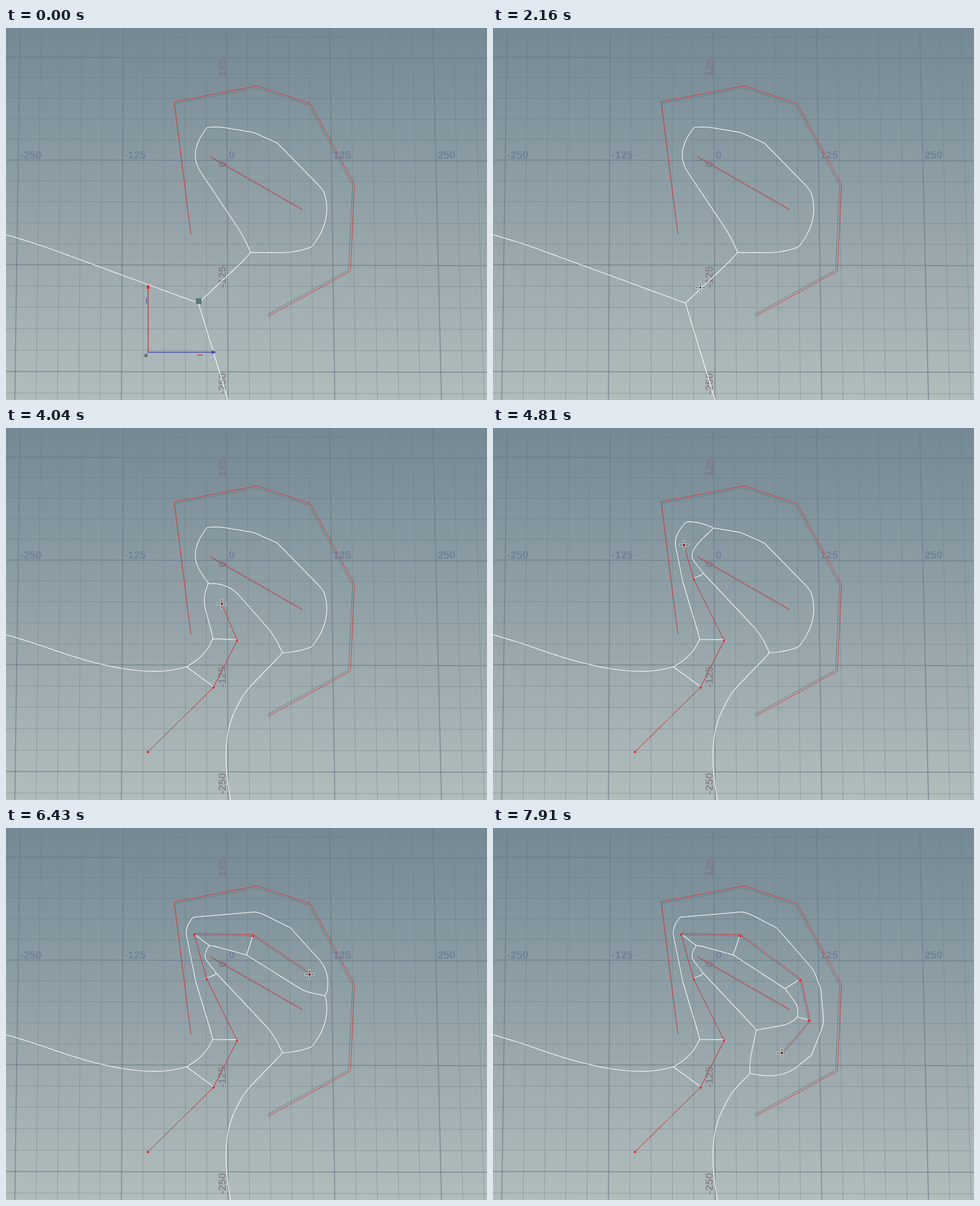
An HTML page with a canvas that plays this animation: 851x658 px, repeating every 8 s.

```html
<!DOCTYPE html>
<html lang="en">
<head>
<meta charset="utf-8">
<title>Interactive medial axis</title>
<style>
html, body { margin: 0; width: 100%; height: 100%; overflow: hidden; background: #93a2a7; }
canvas { display: block; }
</style>
</head>
<body>
<canvas id="stage" width="851" height="658"></canvas>
<script>
const W = 851, H = 658, LOOP = 8000, CELL = 4;
const ctx = document.getElementById('stage').getContext('2d');
const RED = '#ee2424', GREY = '#6a7c81';

// The fixed shapes, and the start of the curve drawn by the pointer
const SHELL = [[327, 364], [298, 134], [444, 106], [536, 137], [613, 278], [606, 428], [462, 507]];
const BAR = [[360, 228], [524, 322]];
const START = [251, 573];

const HOVER = 600, HANDLE_END = 2160, SOLVE_FROM = 2550;
const MIN_LIVE = 60;   // a shorter last segment is not solved yet
const LIFT = 1.6;      // the curve lies a little above its dots

// Pointer path: time, position, and whether it clicks there
const PATH = [
  { t: 70, at: [586, 619] },
  { t: 610, at: [326, 482] },
  { t: 1070, at: [366, 462] },
  { t: 2240, at: [367, 459], click: true },
  { t: 2550, at: [367, 459] },
  { t: 2870, at: [376, 444] },
  { t: 3330, at: [440, 374] },
  { t: 3560, at: [409, 376], click: true },
  { t: 4040, at: [382, 311] },
  { t: 4350, at: [355, 267], click: true },
  { t: 4950, at: [333, 189], click: true },
  { t: 5580, at: [377, 169] },
  { t: 5820, at: [437, 191], click: true },
  { t: 6430, at: [537, 259] },
  { t: 6590, at: [543, 269], click: true },
  { t: 7110, at: [559, 341], click: true },
  { t: 7760, at: [511, 398] }
];

const mix = (a, b, k) => a + (b - a) * k;

function pointerAt(t) {
  if (t < PATH[0].t) return null;
  const i = PATH.findIndex(p => p.t > t);
  if (i < 0) return PATH[PATH.length - 1].at;
  const a = PATH[i - 1], b = PATH[i], k = (t - a.t) / (b.t - a.t);
  return [mix(a.at[0], b.at[0], k), mix(a.at[1], b.at[1], k)];
}

function segments(group, pts) {
  return pts.slice(1).map((q, i) => {
    const p = pts[i], dx = q[0] - p[0], dy = q[1] - p[1];
    return { group, i, p, q, dx, dy, len: Math.hypot(dx, dy) };
  });
}

function distance(s, x, y) {
  const px = x - s.p[0], py = y - s.p[1], dot = px * s.dx + py * s.dy;
  if (dot <= 0) return Math.sqrt(px * px + py * py);
  if (dot >= s.len * s.len) {
    const qx = x - s.q[0], qy = y - s.q[1];
    return Math.sqrt(qx * qx + qy * qy);
  }
  return Math.abs(px * s.dy - py * s.dx) / s.len;
}

// Inside the shell only its two open ends are kept apart
const borderShown = (a, b) =>
  a.group !== 'shell' || b.group !== 'shell' || Math.abs(a.i - b.i) === SHELL.length - 2;

// Traces the Voronoi borders between segments on a coarse grid
function traceBorders(sites) {
  const cols = Math.ceil(W / CELL) + 1, rows = Math.ceil(H / CELL) + 1;
  const label = new Uint8Array(cols * rows), near = new Float64Array(cols * rows);
  for (let n = 0; n < near.length; n++) {
    const x = n % cols * CELL, y = Math.floor(n / cols) * CELL;
    let best = Infinity;
    for (let i = 0; i < sites.length; i++) {
      const d = distance(sites[i], x, y);
      if (d < best - 1e-6) { best = d; label[n] = i; }
    }
    near[n] = best;
  }
  const cross = (hits, c0, r0, c1, r1) => {
    const m = r0 * cols + c0, n = r1 * cols + c1;
    if (label[m] === label[n]) return;
    const a = sites[label[m]], b = sites[label[n]];
    if (!borderShown(a, b)) return;
    const f = distance(b, c0 * CELL, r0 * CELL) - near[m];
    const g = distance(a, c1 * CELL, r1 * CELL) - near[n];
    if (f < 1e-4 || g < 1e-4) return;
    const k = f / (f + g);
    hits.push([mix(c0, c1, k) * CELL, mix(r0, r1, k) * CELL]);
  };
  const path = new Path2D();
  for (let r = 0; r < rows - 1; r++) {
    for (let c = 0; c < cols - 1; c++) {
      const m = r * cols + c, l = label[m];
      if (l === label[m + 1] && l === label[m + cols] && l === label[m + cols + 1]) continue;
      const hits = [];
      cross(hits, c, r, c + 1, r);
      cross(hits, c + 1, r, c + 1, r + 1);
      cross(hits, c, r + 1, c + 1, r + 1);
      cross(hits, c, r, c, r + 1);
      if (hits.length < 2) continue;
      const mid = [0, 1].map(j => hits.reduce((sum, h) => sum + h[j], 0) / hits.length);
      const hub = hits.length === 2 ? hits.pop() : mid;
      for (const h of hits) { path.moveTo(...h); path.lineTo(...hub); }
    }
  }
  return path;
}

function line(pts, color, width = 1, dash = []) {
  ctx.strokeStyle = color;
  ctx.lineWidth = width;
  ctx.setLineDash(dash);
  ctx.beginPath();
  pts.forEach(p => ctx.lineTo(p[0], p[1]));
  ctx.stroke();
  ctx.setLineDash([]);
}

function box(x, y, size, color) {
  ctx.fillStyle = color;
  ctx.fillRect(x - size / 2, y - size / 2, size, size);
}

const columnX = (i, y) => mix(390, 393, y / H) + i * mix(36.5, 37.75, y / H);
const rowY = k => 234 + 36.7 * k + 0.07 * k * k;

function drawGround() {
  const sky = ctx.createLinearGradient(0, 0, 0, H);
  sky.addColorStop(0, '#748994');
  sky.addColorStop(0.5, '#93a2a8');
  sky.addColorStop(1, '#b2bdbd');
  ctx.fillStyle = sky;
  ctx.fillRect(0, 0, W, H);

  const rule = (i, a, b) => i % 5
    ? line([a, b], 'rgba(100,119,130,.47)', 1)
    : line([a, b], 'rgba(104,123,133,.6)', 2);
  for (let i = -11; i <= 13; i++) rule(i, [columnX(i, 0), 0], [columnX(i, H), H]);
  for (let k = -6; k <= 11; k++) rule(k, [0, rowY(k) - 0.5], [W, rowY(k) + 0.9]);

  ctx.font = 'bold 19px "Liberation Sans", Arial, sans-serif';
  for (let n = -2; n <= 2; n++) {
    ctx.fillStyle = 'rgba(104,120,153,.75)';
    ctx.textAlign = 'left';
    ctx.fillText(n * 125, columnX(n * 5, 231) + 3, 231);
    ctx.save();
    ctx.translate(389, rowY(-n * 5) + 2);
    ctx.rotate(-Math.PI / 2);
    ctx.fillStyle = 'rgba(126,115,127,.75)';
    ctx.textAlign = 'right';
    ctx.fillText(n * 125, 0, 0);
    ctx.restore();
  }
}

// Red line over its grey base, set off sideways unless the segment climbs
function drawStroke(pts, gap) {
  const red = [];
  for (const s of segments('', pts)) {
    if (s.len < 1) continue;
    const off = s.dy / s.len > -0.3 ? gap / s.len : 0;
    for (const p of [s.p, s.q]) red.push([p[0] + s.dy * off, p[1] - s.dx * off]);
  }
  line(pts, GREY);
  line(red, RED, 1, [6, 1]);
}

function arrow(x, y, dx, dy, color) {
  ctx.fillStyle = color;
  ctx.beginPath();
  ctx.moveTo(x, y);
  ctx.lineTo(x - dx * 8 - dy * 3.5, y - dy * 8 - dx * 3.5);
  ctx.lineTo(x - dx * 8 + dy * 3.5, y - dy * 8 + dx * 3.5);
  ctx.fill();
}

function drawHandle(hot) {
  const blue = '#3f46a8', slate = '#5c7576', [x, y] = START;
  line([[x + 0.5, y], [x + 0.5, y - 115]], '#a53a3e', 1.3);
  arrow(x + 0.5, y - 120, 0, -1, RED);
  line([[x, y + 0.5], [x + 115, y + 0.5]], blue, 1.3);
  arrow(x + 121, y + 0.5, 1, 0, blue);
  line([[248.5, 478], [248.5, 487]], blue, 1.3);
  line([[338.5, 578.5], [348, 578.5]], RED, 1.5);
  line([[x - 4, y + 6], START], slate);
  box(x - 3.5, y + 6.5, 5.5, slate);
  box(341, 483, 10, slate);
  if (hot) {
    ctx.fillStyle = '#3f8f5c';
    ctx.beginPath();
    ctx.moveTo(346, 478);
    ctx.lineTo(346, 488);
    ctx.lineTo(336, 488);
    ctx.fill();
  }
}

function drawPointer([x, y]) {
  for (let i = 0; i < 4; i++) {
    ctx.save();
    ctx.translate(x, y);
    ctx.rotate(i * Math.PI / 2);
    ctx.strokeStyle = 'rgba(235,240,240,.8)';
    ctx.lineWidth = 0.8;
    ctx.strokeRect(2.5, -1.5, 6, 3);
    line([[3, 0], [8, 0]], '#3a4548', 0.9);
    ctx.restore();
  }
  box(x, y, 2.5, '#222');
}

const fixed = [...segments('shell', SHELL), ...segments('bar', BAR)];
let solvedKey = '', borders;

function solve(curve) {
  const key = curve.join();
  if (key === solvedKey) return;
  solvedKey = key;
  const lifted = curve.map(([x, y]) => [x, y - LIFT]);
  borders = traceBorders([...fixed, ...segments('curve', lifted)]);
}

function draw(t) {
  const tip = pointerAt(t);
  const placed = [START, ...PATH.filter(p => p.click && p.t <= t).map(p => p.at)];
  const drawing = placed.length > 1;

  if (t < SOLVE_FROM) {
    solve([START, START]);
  } else {
    const last = placed[placed.length - 1];
    const live = Math.hypot(tip[0] - last[0], tip[1] - last[1]) >= MIN_LIVE;
    solve(live ? [...placed, tip] : placed);
  }

  drawGround();
  drawStroke(SHELL, 3.5);
  drawStroke(BAR, 1.5);
  ctx.strokeStyle = '#fff';
  ctx.lineWidth = 1.1;
  ctx.stroke(borders);

  if (drawing) {
    const curve = [...placed, tip];
    drawStroke(curve, 2.5);
    for (const p of curve) box(p[0], p[1], 3.6, RED);
  }
  if (t < HANDLE_END) drawHandle(t >= HOVER);
  if (tip) drawPointer(tip);
}

const begin = performance.now();
function frame() {
  draw((performance.now() - begin) % LOOP);
  requestAnimationFrame(frame);
}
frame();
</script>
</body>
</html>
```
